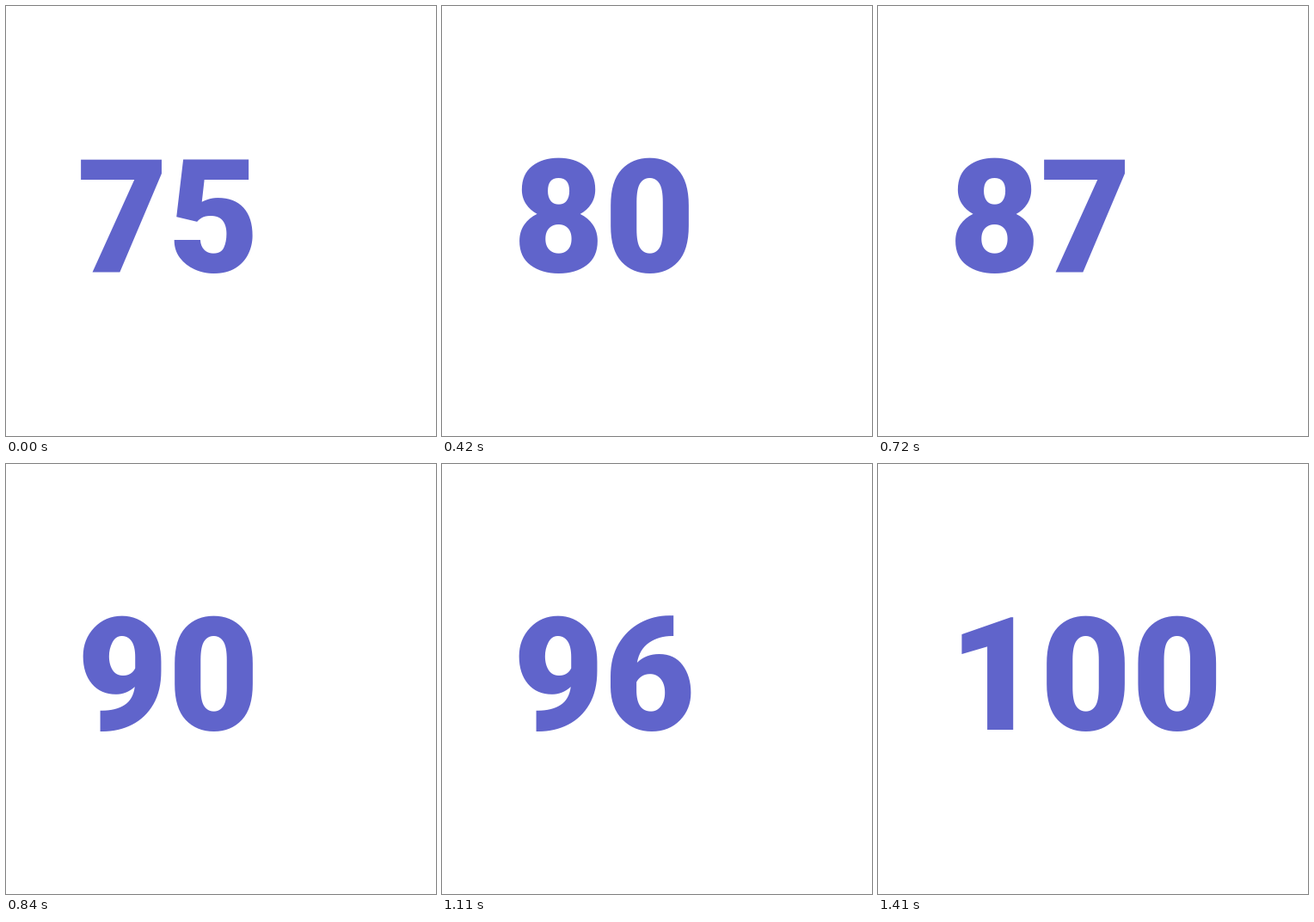
An HTML page with a canvas for the animation above (1530 ms loop, 500 px wide and 500 px high).

```html
<!DOCTYPE html>
<html lang="en">
<head>
<meta charset="utf-8">
<title>Counter</title>
<style>
  html, body { margin: 0; width: 100%; height: 100%; overflow: hidden; background: #fff; }
  canvas { display: block; }
</style>
</head>
<body>
<canvas id="stage" width="500" height="500"></canvas>
<script>
  const LOOP = 1530, TICK = 30, PHASE = 9;
  const FROM = 75, TO = 100;
  const ctx = document.getElementById('stage').getContext('2d');

  const easeInOutSine = p => (1 - Math.cos(Math.PI * p)) / 2;

  function valueAt(ms) {
    const tick = Math.floor((ms % LOOP) / TICK) * TICK;
    return Math.round(FROM + (TO - FROM) * easeInOutSine((tick + PHASE) / LOOP));
  }

  function draw(value) {
    ctx.fillStyle = '#fff';
    ctx.fillRect(0, 0, 500, 500);
    ctx.fillStyle = '#6064cb';
    ctx.font = '900 183px Roboto, sans-serif';
    ctx.fillText(value, 82.5, 309.3);
  }

  const start = performance.now();
  function frame() {
    draw(valueAt(performance.now() - start));
    requestAnimationFrame(frame);
  }
  frame();
</script>
</body>
</html>
```
